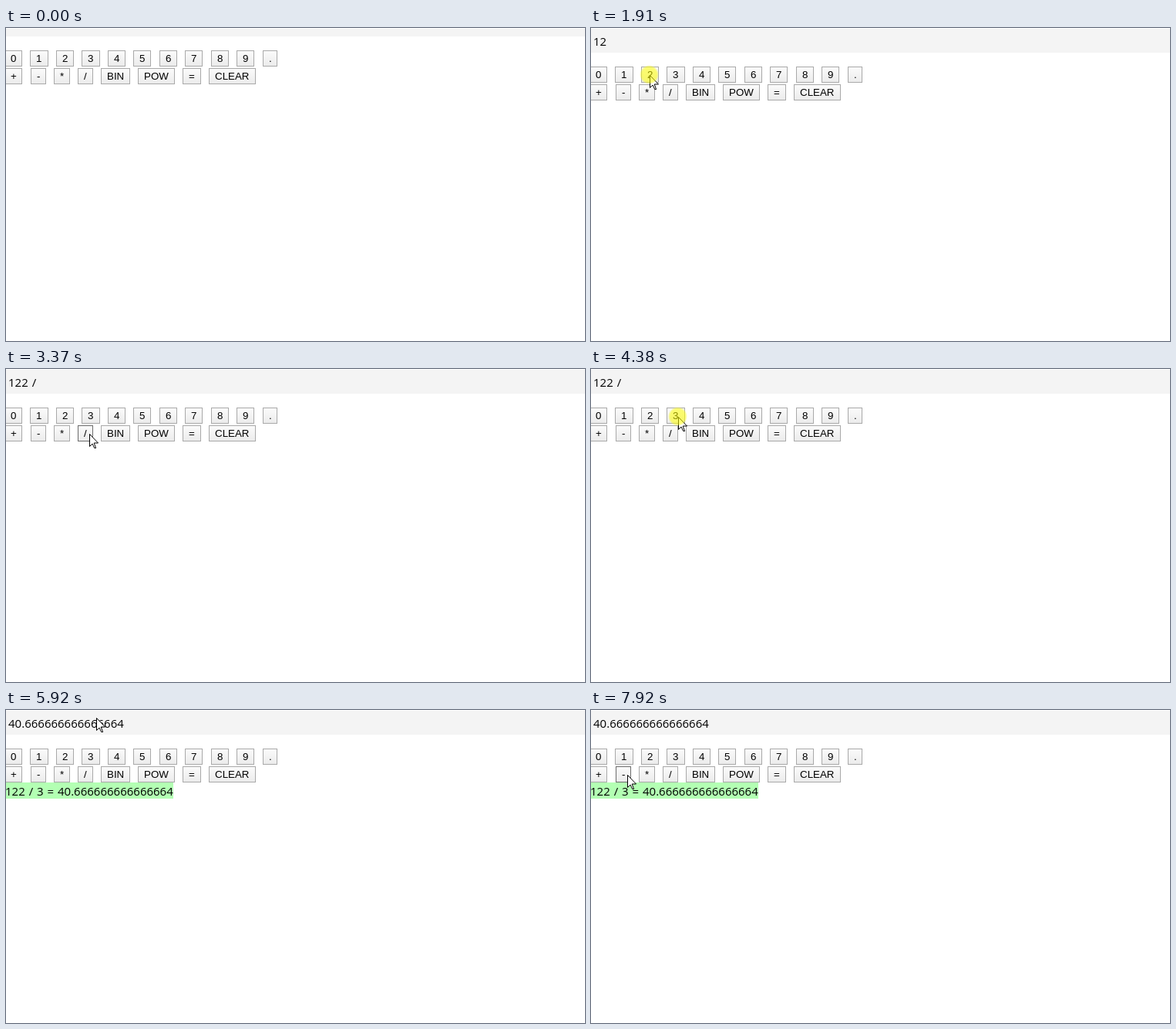
An HTML page that plays this animation: 751 by 406 pixels, repeating every 8 s.

```html
<!DOCTYPE html>
<html lang="en">
<head>
<meta charset="utf-8">
<title>Calculator</title>
<style>
  html, body { margin: 0; width: 100%; height: 100%; overflow: hidden; background: #fff; }
  svg { display: block; }
  .line { font: 15px "Open Sans", "Noto Sans", sans-serif; word-spacing: 1px; white-space: pre; }
  .key rect { fill: url(#face); stroke: #a9a9a9; }
  .key.hover rect { stroke: #6c6c6c; }
  .key text { font: 13.333px "Liberation Sans", Arial, sans-serif; }
</style>
</head>
<body>
<svg width="751" height="406" viewBox="0 0 751 406">
  <defs>
    <linearGradient id="face" x2="0" y2="1">
      <stop stop-color="#fbfbfb"/><stop offset="1" stop-color="#ebebeb"/>
    </linearGradient>
    <radialGradient id="light">
      <stop offset=".8" stop-color="#ff0" stop-opacity=".55"/>
      <stop offset="1" stop-color="#ff0" stop-opacity=".2"/>
    </radialGradient>
  </defs>
  <rect id="bar" y="1" width="751" fill="#f4f4f4"/>
  <text id="display" class="line" x="3" y="23"></text>
  <g id="keys"></g>
  <g id="history">
    <rect y="94" width="217" height="21" fill="#b3ffb3"/>
    <text id="record" class="line" x="-1" y="111"></text>
  </g>
  <path id="cursor" d="M.5.5v16l3.5-3.5 2.7 5.5h1.9l-2.4-6.5h5.3z" fill="#fff" stroke="#000"/>
  <circle id="glow" r="12" fill="url(#light)"/>
</svg>
<script>
const LOOP = 8000, TICK = 1000 / 13;
const $ = id => document.getElementById(id);
const mix = (a, b, u) => a + (b - a) * u;

// Keys follow one another, each as wide as its label plus padding.
const keys = [];
["0 1 2 3 4 5 6 7 8 9 .", "+ - * / BIN POW = CLEAR"].forEach((row, r) => {
  let x = -2.36;
  for (const label of row.split(" ")) {
    const top = 29 + 23 * r, left = Math.round(x);
    $("keys").insertAdjacentHTML("beforeend", `<g class="key">
      <rect x="${left + .5}" y="${top + .5}" height="20"/>
      <text x="${left + 8}" y="${top + 15}">${label}</text></g>`);
    const node = $("keys").lastElementChild;
    const end = x + node.querySelector("text").getComputedTextLength() + 16;
    const right = Math.round(end);
    node.querySelector("rect").setAttribute("width", right - left - 1);
    keys.push({ node, left, right, top });
    x = end + 10.065;
  }
});

// Cursor strokes in ticks; a bend is the control point of a curve.
const start = [577, 374];
const moves = [
  { from: 2, to: 11, end: [43, 37], bend: [-100, 40] },
  { from: 13, to: 19, end: [76, 61] },
  { from: 27, to: 31, end: [243, 83] },
  { from: 32, to: 38, end: [107, 88], bend: [175, 77] },
  { from: 43, to: 47, end: [113, 62] },
  { from: 58, to: 66, end: [238, 86], bend: [175, 120] },
  { from: 70, to: 81, end: [255, 58], bend: [-70, -62] },
  { from: 81, to: 88, end: [286, 77], bend: [391, 45] },
  { from: 89, to: 100, end: [70, 81], bend: [430, 40] },
  { from: 100, to: 103, end: [47, 84] }
];
const presses = [
  { down: 12, up: 13, input: "1" },
  { down: 20, up: 22, input: "2" },
  { down: 25, up: 26, input: "2" },
  { down: 41, up: 42, input: " / " },
  { down: 57, up: 58, input: "3" },
  { down: 67, up: 68, input: "=" }
];

function cursorAt(tick) {
  let at = start;
  for (const { from, to, end, bend } of moves) {
    if (tick < from) break;
    const f = Math.min(1, (tick - from) / (to - from));
    const u = f * f * (3 - 2 * f), a = at;
    at = end.map((e, i) => {
      const b = bend ? bend[i] : (a[i] + e) / 2;
      return Math.round(mix(mix(a[i], b, u), mix(b, e, u), u));
    });
    if (f < 1) break;
  }
  return at;
}

function show(id, on) {
  $(id).style.display = on ? "" : "none";
}

function draw(ms) {
  const tick = Math.floor((ms + 16) / TICK);
  const [x, y] = cursorAt(tick);
  const pressed = presses.some(p => tick >= p.down && tick < p.up);
  const typed = presses.filter(p => tick >= p.up).map(p => p.input).join("");
  const sum = typed.replace("=", ""), done = sum !== typed;
  const [a, b] = sum.split(" / ");
  const shift = typed ? 21 : 0;

  $("display").textContent = done ? a / b : sum;
  $("record").textContent = done ? `${sum} = ${a / b}` : "";
  $("bar").setAttribute("height", 10 + shift);
  $("keys").setAttribute("transform", `translate(0 ${shift})`);
  for (const k of keys) {
    const top = k.top + shift;
    const over = x >= k.left && x < k.right && y >= top && y < top + 21;
    k.node.classList.toggle("hover", over && !pressed);
  }
  show("history", done);
  show("glow", pressed);
  show("cursor", tick >= moves[0].from);
  $("glow").setAttribute("transform", `translate(${x - .5} ${y - .5})`);
  $("cursor").setAttribute("transform", `translate(${x} ${y})`);
}

function loop() {
  draw(performance.now() % LOOP);
  requestAnimationFrame(loop);
}
loop();
</script>
</body>
</html>
```
